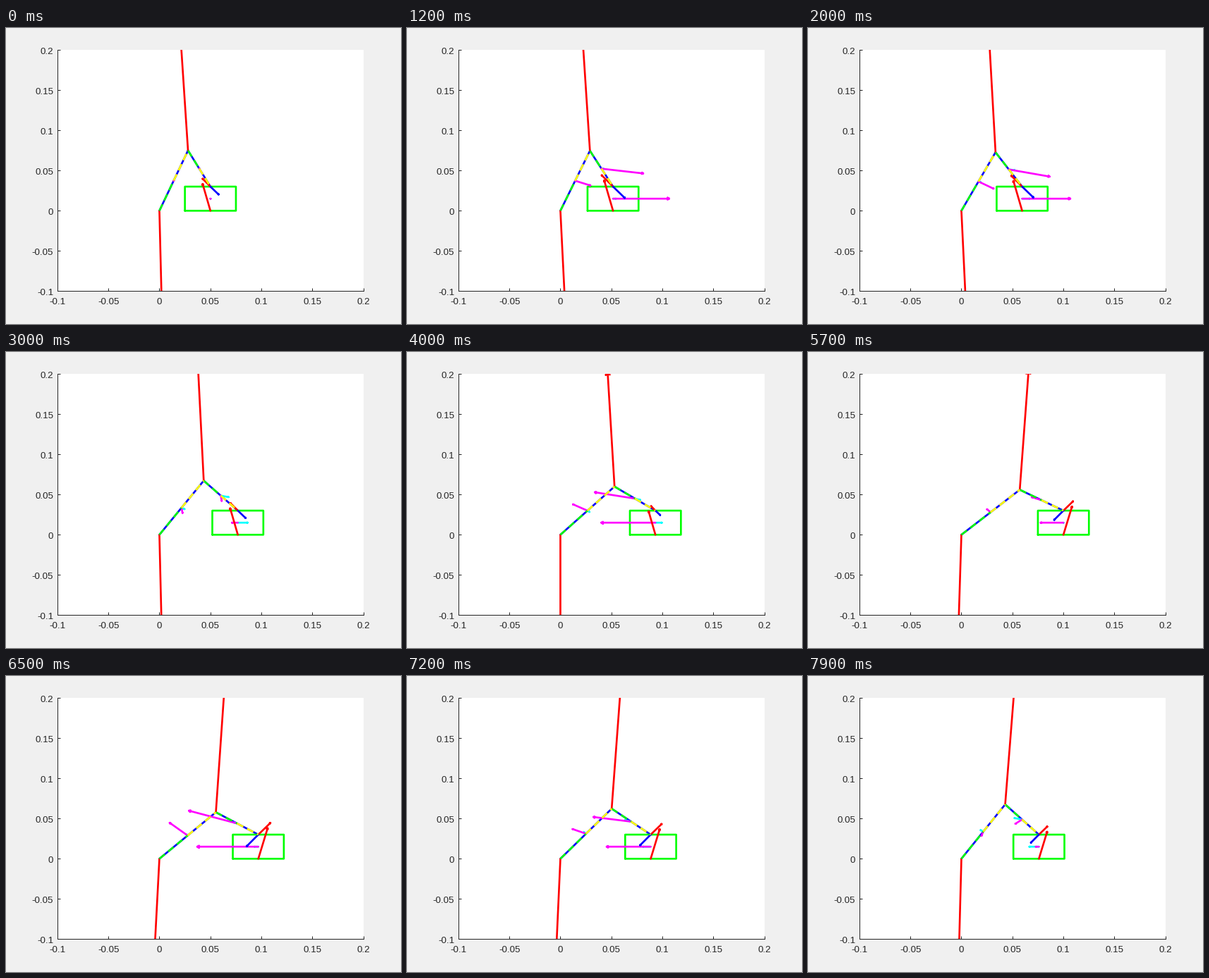
Recreate the animation shown at these times as a matplotlib script. Size 560x420 px, loop 8 s.

```python
import numpy as np
import matplotlib
import matplotlib.pyplot as plt
from matplotlib.animation import FuncAnimation
from matplotlib.transforms import ScaledTranslation

matplotlib.rcParams["font.family"] = "Liberation Sans"

CRANK, ROD, PIN_Y = 0.08, 0.05, 0.03
BOX_W, LIFT = 0.05, 0.05
MU_FLOOR, MU_PIN = 0.235, 0.8
BOX_MASS, BOX_WEIGHT = 0.045, 0.0235
CRANK_MASS, ROD_MASS = 0.1, 0.08
ROD_WEIGHT, LINKS_WEIGHT = 0.137, 0.4
SWAY = 0.0004
HOLD, FRAMES, STEP = 4, 80, 100
PT = 72 / 100
WIDTH = 2.667 * PT
INK = "#262626"
LEFT, TOP, W, H = 72.8, 31.0, 434.0, 342.45
PX = np.array([W, H]) / 0.3  # pixels per unit

fig = plt.figure(figsize=(5.6, 4.2), dpi=100, facecolor="#f0f0f0")
ax = fig.add_axes([LEFT / 560, 1 - (TOP + H) / 420, W / 560, H / 420],
                  facecolor="white")
ax.set(xlim=(-0.1, 0.2), ylim=(-0.1, 0.2))
ticks = np.round(np.arange(-0.1, 0.21, 0.05), 2)
names = [f"{v:g}" for v in ticks + 0.0]
ax.set_xticks(ticks, names)
ax.set_yticks(ticks, names)
ax.tick_params(direction="in", length=4.3 * PT, width=PT,
               color=INK, labelcolor=INK, labelsize=13.33 * PT)
ax.tick_params(axis="x", pad=10 * PT)
ax.tick_params(axis="y", pad=5.5 * PT)
drop = ScaledTranslation(0, -0.012, fig.dpi_scale_trans)
for label in ax.get_yticklabels():
    label.set_transform(label.get_transform() + drop)
for side in ("top", "right"):
    ax.spines[side].set_visible(False)
for side in ("left", "bottom"):
    ax.spines[side].set(color=INK, linewidth=PT, zorder=1)


def line(color, z, dashed=False):
    art, = ax.plot([], [], color=color, lw=WIDTH, zorder=z, snap=False,
                   solid_joinstyle="round", solid_capstyle="round",
                   dash_capstyle="butt")
    if dashed:
        art.set_linestyle((0, (3.75, 2.25)))
    return art


links = [line("blue", 3) for _ in range(2)]
box = line("lime", 4)
speeds = [line("cyan", 5) for _ in range(3)]
accels = [line("magenta", 6) for _ in range(3)]
reds = [line("red", 7) for _ in range(4)]
push = line("blue", 8)
inner = [line("lime", 9, True) for _ in range(2)]
outer = [line("yellow", 9, True) for _ in range(2)]


def put(art, *points):
    art.set_data(*np.array(points).T)


def arrow(art, tail, vec):
    vec = np.asarray(vec, float) + [2e-4, 0]  # a zero arrow stays a dot
    tip = tail + vec
    v = vec * PX
    side = np.array([-v[1], v[0]])
    left = tip + (-0.03 * v + 0.017 * side) / PX
    right = tip + (-0.03 * v - 0.017 * side) / PX
    put(art, tail, tip, left, tip, right)


def knee(x):
    d = np.hypot(x, PIN_Y)
    a = np.arctan2(PIN_Y, x) + np.arccos(
        (CRANK**2 + d**2 - ROD**2) / (2 * CRANK * d))
    return CRANK * np.array([np.cos(a), np.sin(a)])


def slide(n):
    """Box position, velocity and acceleration: 3-4-5 rise, then return."""
    span, sign = (50, 1) if n <= 50 else (49, -1)
    t = (max(n, 0) if n <= 50 else n - 51) / span
    s = 10 * t**3 - 15 * t**4 + 6 * t**5
    v = 30 * t**2 - 60 * t**3 + 30 * t**4
    a = 60 * t - 180 * t**2 + 120 * t**3
    x = 0.05 + LIFT * (s if sign > 0 else 1 - s)
    return x, sign * LIFT * v / span, sign * LIFT * a / span**2, sign


def centres(n):
    """Midpoints of crank and rod."""
    x = slide(n)[0]
    k = knee(x)
    return np.array([k / 2, (k + [x, PIN_Y]) / 2])


def draw(i):
    n = i - HOLD
    x, v, a, sign = slide(n)
    k = knee(x)
    base, pin = np.zeros(2), np.array([x, PIN_Y])
    h = 1e-4
    kv = 5 * v * (knee(x + h) - knee(x - h)) / (2 * h)
    bv, ba = np.array([5 * v, 0]), np.array([500 * a, 0])

    # the links' accelerations are backward differences
    mids = centres(n)
    a1, a2 = 500 * (mids - 2 * centres(n - 1) + centres(n - 2))
    spots = [*mids, np.array([x, PIN_Y / 2])]
    vels = [kv / 2, (kv + bv) / 2, bv]
    for j, acc in enumerate([a1, a2, ba]):
        arrow(speeds[j], spots[j], vels[j])
        arrow(accels[j], spots[j], acc)

    down = (sign * BOX_MASS * ba[0] + MU_FLOOR * BOX_WEIGHT) / (MU_PIN - MU_FLOOR)
    force = np.array([sign * MU_PIN * down, -down])
    normal = down + BOX_WEIGHT
    joint = ROD_MASS * a2 - force + [SWAY * (v / 0.001)**2, ROD_WEIGHT]
    ground = force + ROD_MASS * a2 + CRANK_MASS * a1 - [0, LINKS_WEIGHT]
    arrow(push, pin, force)
    arrow(reds[0], pin, -force)
    arrow(reds[1], np.array([x, 0]), [-sign * MU_FLOOR * normal, normal])
    arrow(reds[2], k, joint)
    arrow(reds[3], base, ground)

    for j, (p, q) in enumerate([(base, k), (k, pin)]):
        put(links[j], p, q)
        put(inner[j], p, mids[j])
        put(outer[j], mids[j], q)
    l, r = x - BOX_W / 2, x + BOX_W / 2
    put(box, (l, 0), (r, 0), (r, PIN_Y), (l, PIN_Y), (l, 0))
    return []


anim = FuncAnimation(fig, draw, frames=FRAMES, interval=STEP, repeat=True,
                     repeat_delay=0, init_func=lambda: draw(0), blit=False)
plt.show()
```
